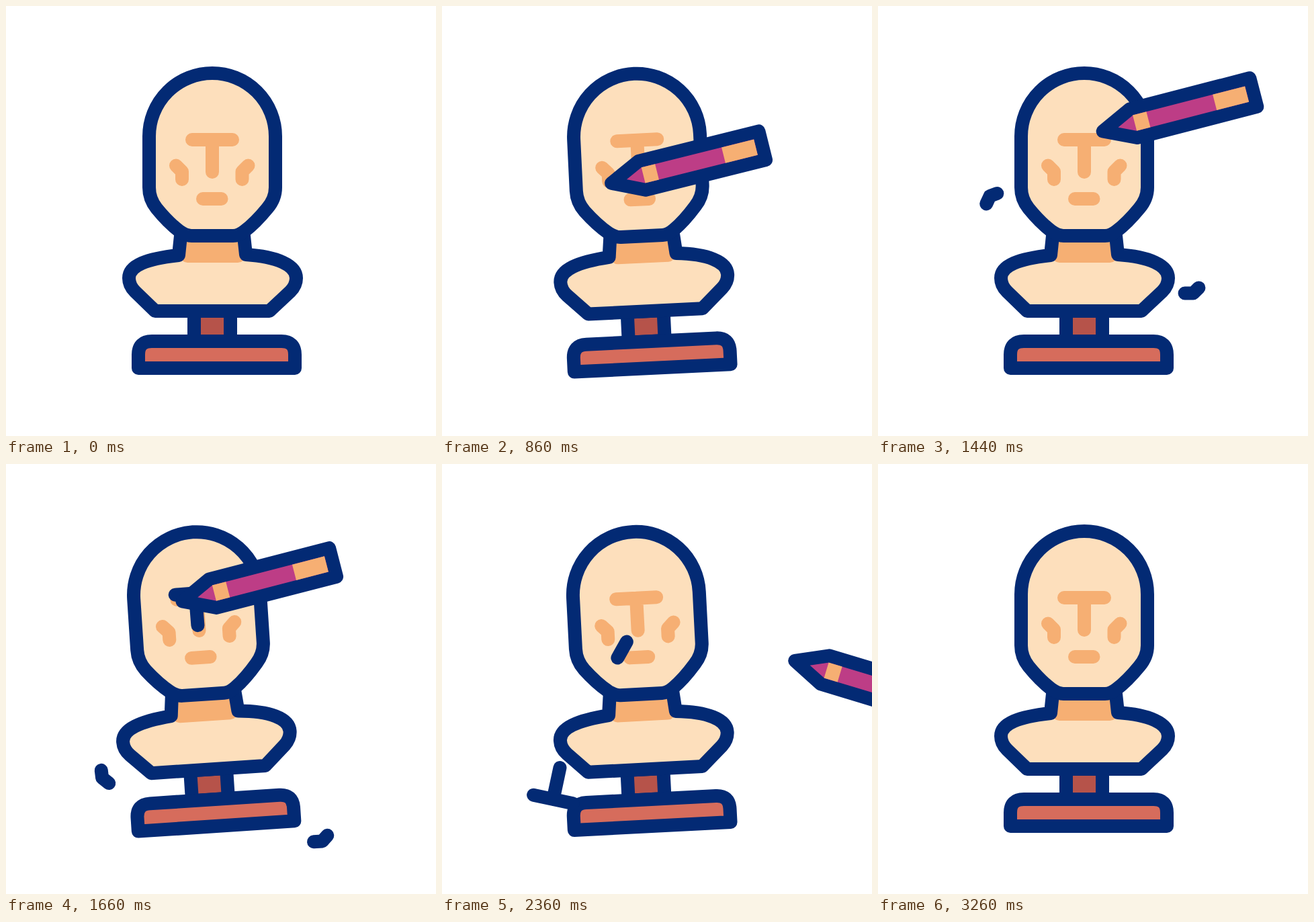
An HTML page that plays this animation: 640 by 640 pixels, repeating every 3.52 s.

```html
<!DOCTYPE html>
<html lang="en">
<head>
<meta charset="utf-8">
<title>Bust sculpting</title>
<style>
  html, body { margin: 0; width: 100%; height: 100%; overflow: hidden; background: #fff; }
  svg { display: block; width: 100%; height: 100%; }
  .ink, .line { stroke-width: 20; stroke-linecap: round; stroke-linejoin: round; }
  .ink { stroke: #032a74; }
  .line { fill: none; }
  .feature { stroke: #f6af73; }
  #chips use { transform-box: fill-box; transform-origin: center; }
</style>
</head>
<body>
<svg viewBox="0 0 640 640">
  <defs>
    <path id="eyeR" d="M360.500 237.500L351.500 246.500V258"/>
    <path id="eyeL" d="M253 237.500L262 246.500V258"/>
    <path id="brow" d="M277 199H337M307 199V247"/>
    <path id="mouth" d="M293 287H320.500"/>
  </defs>
  <g id="bust">
    <path class="ink" fill="#b6534a" d="M280 454H334V499H280Z"/>
    <path class="ink" fill="#d66c5c" d="M197 539V519Q197 499 217 499H410Q430 499 430 519V539Z"/>
    <path fill="#fddfbc" d="M257 371C210 376 183 386 183 405Q183 416 192 425L222 454H392L423 425Q432 416 432 405C432 386 404 372 357 371Z"/>
    <path fill="#f6af73" d="M260 342H354L357 371Q354 382 345 382H270Q262 382 257 371Z"/>
    <path class="ink" fill="none" d="M260 342L257 371C210 376 183 386 183 405Q183 416 192 425L222 454H392L423 425Q432 416 432 405C432 386 404 373 357 370L354 342"/>
    <path class="ink" fill="#fddfbc" d="M213 194A94 94 0 0 1 401 194V270Q401 287 389 301Q371 323 355 335Q346 342 338 342H276Q268 342 258 335Q241 322 224 301Q213 287 213 270Z"/>
    <g class="line feature">
      <use href="#eyeR"/><use href="#eyeL"/><use href="#brow"/><use href="#mouth"/>
    </g>
    <g id="chips" class="line ink"></g>
  </g>
  <g id="pencil">
    <path class="ink" fill="#bd3d86" d="M0 0L47 -22H231.500V22H47Z"/>
    <path fill="#f6af73" d="M49 -12H70V12H49ZM172 -12H221.500V12H172Z"/>
  </g>
</svg>
<script>
const LOOP = 3520;

// Each blow of the pencil: when, where the tip lands, how far it was drawn back,
// and how the chip it knocks off drifts, spins and falls (seconds, pixels, degrees).
const blows = [
  { shape: "eyeR", at: 445, x: 338, y: 246, angle: -22, pull: 30,
    drift: 111, driftTime: 0.7, bend: 1, spin: 225, spinTime: 0.7, lift: -216, gravity: 788 },
  { shape: "eyeL", at: 870, x: 247, y: 265, angle: -14, pull: 120,
    drift: -118, driftTime: 1, bend: 0.52, spin: -339, spinTime: 1.5, lift: -434, gravity: 1759 },
  { shape: "brow", at: 1635, x: 262, y: 204.5, angle: -14.5, pull: 76,
    drift: -200, driftTime: 1, bend: 1.28, spin: -165, spinTime: 0.64, lift: -332, gravity: 1845 },
  { shape: "mouth", at: 2234, x: 300, y: 288.5, angle: -9.4, pull: 40,
    drift: -195, driftTime: 1, bend: 1, spin: -193, spinTime: 0.35, lift: -212, gravity: 1800 }
];

const progress = (t, from, to) => Math.min(1, Math.max(0, (t - from) / (to - from)));
const smooth = u => u * u * (3 - 2 * u);
const ease = (t, from, to) => smooth(progress(t, from, to));

// The blow's pose, moved back along the pencil's own axis.
function pulled({ x, y, angle }, distance) {
  const a = angle * Math.PI / 180;
  return [x + distance * Math.cos(a), y + distance * Math.sin(a), angle];
}

// Enter, then for each blow: draw back, strike, recoil and wait; finally fly out.
function planPencil() {
  const stops = [{ t: 90, pose: [670, 250, 8] }];
  const stop = (t, pose) => stops.push({ t, pose });
  blows.forEach((blow, i) => {
    const previous = blows[i - 1];
    if (previous) {
      const rest = pulled(previous, 20), recoiled = previous.at + 135;
      stop(recoiled, rest);
      stop(Math.max(recoiled, blow.at - 450), rest);
    }
    stop(blow.at - 175, pulled(blow, blow.pull));
    stop(blow.at + 15, pulled(blow, 0));
  });
  stop(2452, [690, 296, 36]);
  return stops;
}

const stops = planPencil();

function pencilPose(t) {
  const next = stops.findIndex(stop => stop.t > t);
  if (next <= 0) return stops[next < 0 ? stops.length - 1 : 0].pose;
  const from = stops[next - 1], to = stops[next];
  const u = ease(t, from.t, to.t);
  return from.pose.map((value, i) => value + (to.pose[i] - value) * u);
}

// Every blow rocks the bust back by four degrees.
const tilt = t => blows.reduce((sum, { at }) =>
  sum - 4 * (ease(t, at - 110, at + 50) - ease(t, at + 50, at + 280)), 0);

const byId = id => document.getElementById(id);
const bust = byId("bust"), pencil = byId("pencil");
for (const blow of blows) {
  blow.chip = document.createElementNS("http://www.w3.org/2000/svg", "use");
  blow.chip.setAttribute("href", "#" + blow.shape);
  byId("chips").append(blow.chip);
}

function drawChip(blow, t) {
  const s = (t - blow.at) / 1000;
  blow.chip.setAttribute("visibility", s >= 0 ? "visible" : "hidden");
  if (s < 0) return;
  const dx = blow.drift * progress(s, 0, blow.driftTime) ** blow.bend;
  const dy = blow.lift * s + blow.gravity * s * s / 2;
  const turn = blow.spin * ease(s, 0, blow.spinTime);
  blow.chip.setAttribute("transform", `translate(${dx} ${dy}) rotate(${turn})`);
}

function draw(t) {
  bust.setAttribute("transform", `rotate(${tilt(t)} 313 545)`);
  for (const blow of blows) drawChip(blow, t);
  const [x, y, angle] = pencilPose(t);
  pencil.setAttribute("transform", `translate(${x} ${y}) rotate(${angle})`);
}

const began = performance.now();
function tick() {
  draw((performance.now() - began) % LOOP);
  requestAnimationFrame(tick);
}
tick();
</script>
</body>
</html>
```
